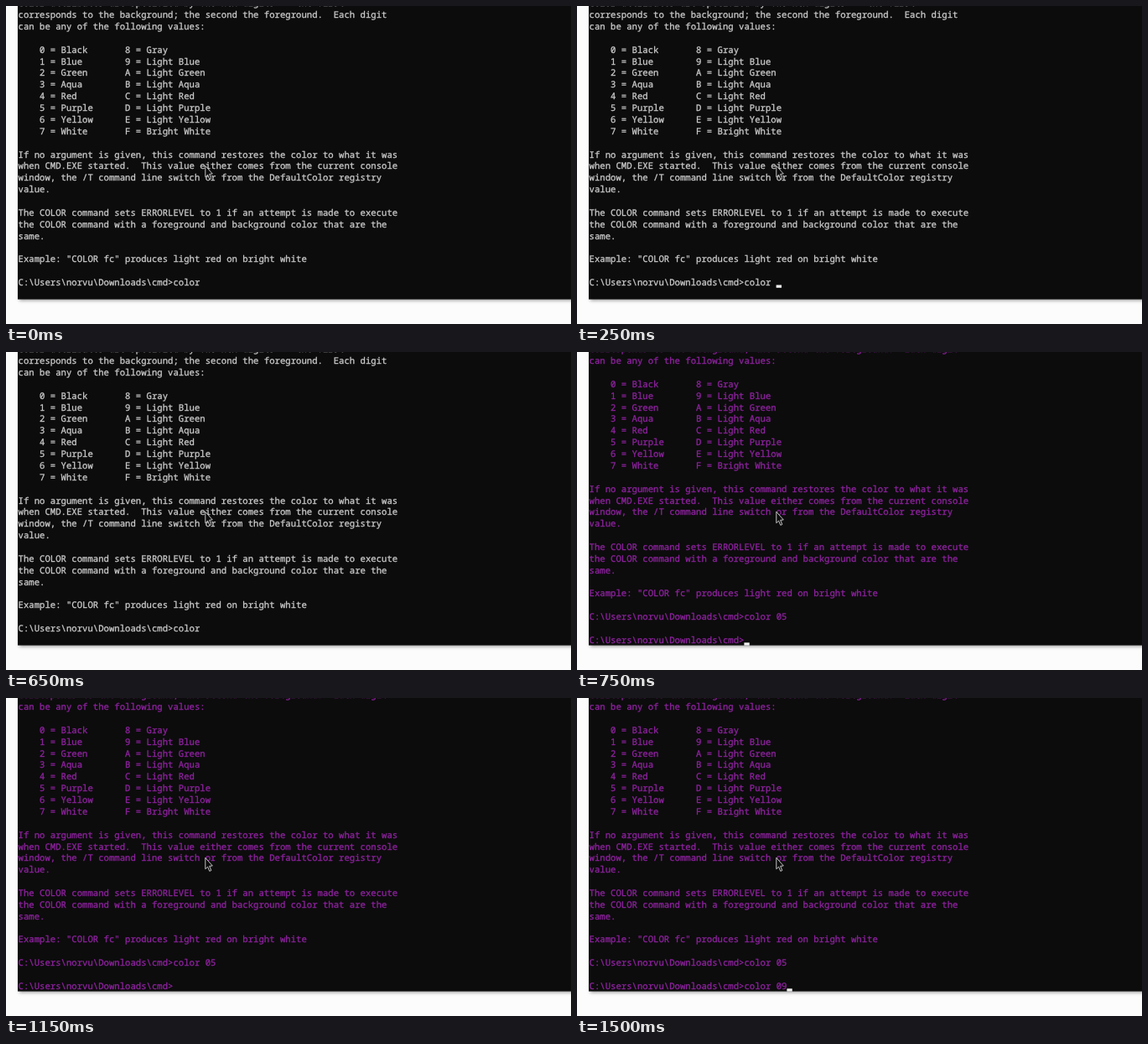
Recreate the animation shown at these times as an HTML page with a canvas. Size 674 px wide and 379 px high, loop 1750 ms.

```html
<!DOCTYPE html>
<html lang="en">
<head>
<meta charset="utf-8">
<title>Console colors</title>
<style>
html, body { margin: 0; width: 100%; height: 100%; overflow: hidden; background: #fcfcfc; }
canvas { display: block; }
</style>
</head>
<body>
<canvas id="stage" width="674" height="379"></canvas>
<script>
const ctx = document.getElementById('stage').getContext('2d');
const LEFT = 14.5, CELL = 6.375, LINE = 13.87, BASE = 333.1;
const STEP = 250, LOOP = 1750;
const PROMPT = 'C:\\Users\\norvu\\Downloads\\cmd>';
const GRAY = '#cccccc', PURPLE = '#8f22a0';

const HELP = `Color attributes are specified by TWO hex digits -- the first
corresponds to the background; the second the foreground.  Each digit
can be any of the following values:

    0 = Black       8 = Gray
    1 = Blue        9 = Light Blue
    2 = Green       A = Light Green
    3 = Aqua        B = Light Aqua
    4 = Red         C = Light Red
    5 = Purple      D = Light Purple
    6 = Yellow      E = Light Yellow
    7 = White       F = Bright White

If no argument is given, this command restores the color to what it was
when CMD.EXE started.  This value either comes from the current console
window, the /T command line switch or from the DefaultColor registry
value.

The COLOR command sets ERRORLEVEL to 1 if an attempt is made to execute
the COLOR command with a foreground and background color that are the
same.

Example: "COLOR fc" produces light red on bright white
`.split('\n');

// What is typed on the last line, and whether the caret shows.
const STATES = [
  { typed: 'color ', caret: false },
  { typed: 'color ', caret: true },
  { typed: 'color ', caret: false },
  { typed: '', caret: true, ran: true },
  { typed: '', caret: false, ran: true },
  { typed: 'color 05', caret: true, ran: true },
  { typed: 'color 09', caret: true, ran: true }
];

function drawWindow() {
  ctx.fillStyle = '#fcfcfc';
  ctx.fillRect(0, 0, 674, 379);
  ctx.save();
  ctx.shadowColor = 'rgba(0,0,0,.4)';
  ctx.shadowBlur = 4;
  ctx.shadowOffsetX = 2;
  ctx.shadowOffsetY = 1;
  ctx.fillStyle = '#0c0c0c';
  ctx.fillRect(14, -20, 700, 369.6);
  ctx.restore();
}

// A thin outline gives the glyphs a medium weight.
function drawLine(text, y) {
  [...text].forEach((ch, i) => {
    if (ch === ' ') return;
    ctx.fillText(ch, LEFT + i * CELL, y);
    ctx.strokeText(ch, LEFT + i * CELL, y);
  });
}

function drawPointer() {
  ctx.beginPath();
  ctx.moveTo(237.8, 190.4);
  ctx.lineTo(237.8, 203.8);
  ctx.lineTo(240.6, 201.2);
  ctx.lineTo(242.8, 206.4);
  ctx.lineTo(244.8, 205.5);
  ctx.lineTo(242.7, 200.4);
  ctx.lineTo(246.3, 200);
  ctx.closePath();
  ctx.fillStyle = '#0c0c0c';
  ctx.fill();
  ctx.lineWidth = 0.9;
  ctx.strokeStyle = '#d8d8d8';
  ctx.stroke();
}

function draw(time) {
  const { typed, caret, ran } = STATES[Math.floor((time % LOOP) / STEP)];
  const lines = [...HELP];
  if (ran) lines.push(PROMPT + 'color 05', '');
  const last = PROMPT + typed;
  lines.push(last);

  // The screen scrolls one row once the command has run.
  const bottom = BASE + (ran ? LINE : 0);
  drawWindow();
  ctx.font = '10.625px "Noto Sans Mono", "DejaVu Sans Mono", monospace';
  ctx.textRendering = 'geometricPrecision';
  ctx.textBaseline = 'alphabetic';
  ctx.lineWidth = 0.3;
  ctx.lineJoin = 'round';
  ctx.fillStyle = ctx.strokeStyle = ran ? PURPLE : GRAY;
  lines.forEach((text, i) => drawLine(text, bottom - (lines.length - 1 - i) * LINE));

  if (caret) {
    ctx.fillStyle = '#f2f2f2';
    ctx.fillRect(LEFT + last.length * CELL, bottom - 0.6, CELL, 3.3);
  }
  drawPointer();
}

const start = performance.now();
function tick() {
  draw(performance.now() - start);
  requestAnimationFrame(tick);
}
tick();
</script>
</body>
</html>
```
